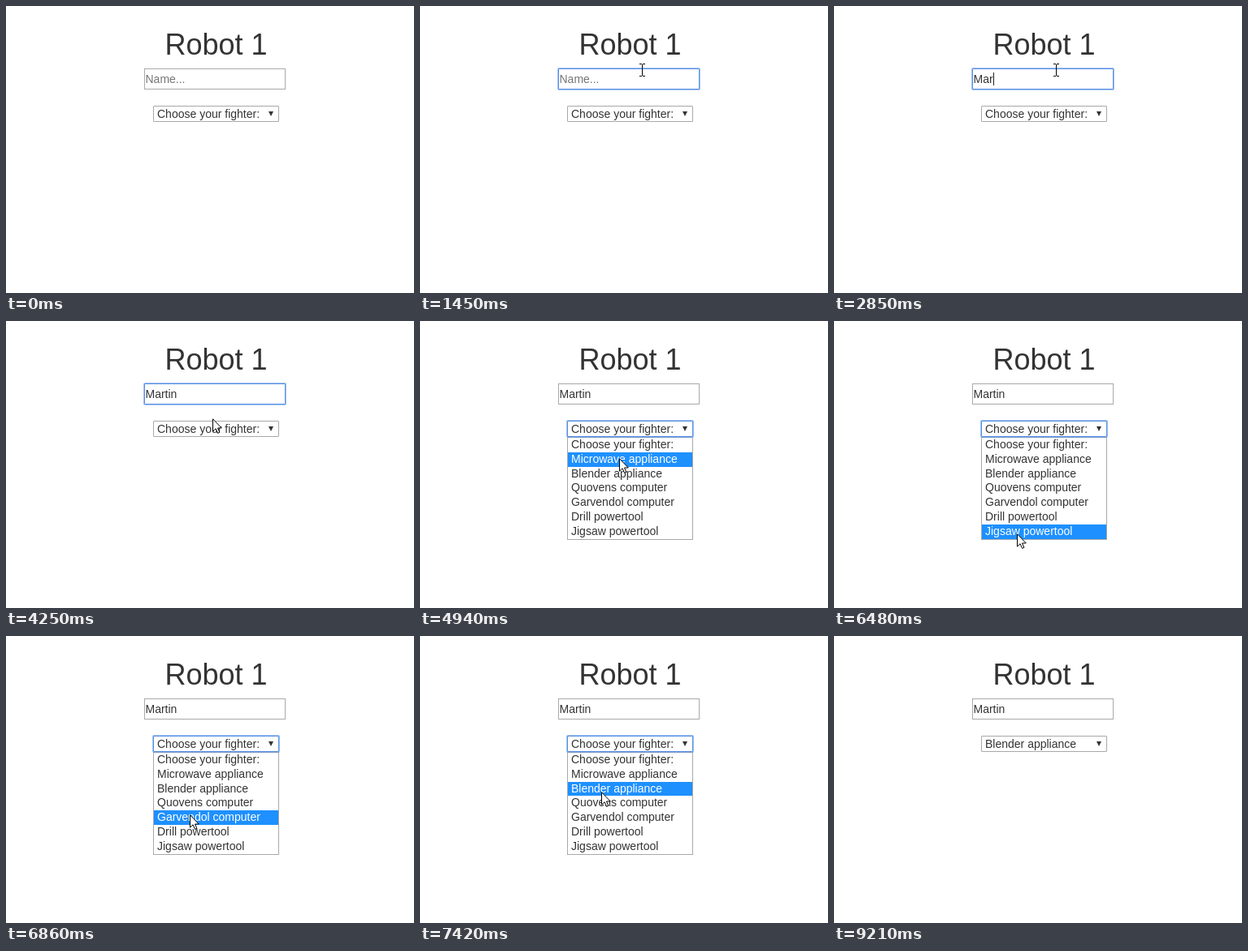
Write an HTML page that moves like this. It is 502x354 px and loops after 9310 ms.

```html
<!DOCTYPE html>
<html lang="en">
<head>
<meta charset="utf-8">
<title>Robot 1</title>
<style>
  html, body { margin: 0; width: 100%; height: 100%; overflow: hidden; background: #fff; }
  body { position: relative; font: 14px/16px "Liberation Sans", Arial, sans-serif; color: #333; }
  body * { box-sizing: border-box; }
  h1, .box, .box > b, .opt, svg { position: absolute; white-space: pre; }
  h1 { left: 195.5px; top: 27px; margin: 0; font-size: 36px; line-height: 41px; font-weight: 400; }
  .box { border: 1px solid #a9a9a9; background: #fff; }
  .focus { border-color: #5790e4; border-radius: 1px; box-shadow: 0 0 0 1px rgba(87, 144, 228, .55); }
  #field { left: 170px; top: 77px; width: 174px; height: 26px; padding: 4px .5px; }
  #hint { color: #757575; }
  #caret { display: inline-block; width: 1px; height: 16px; margin-right: -1px; background: #222; vertical-align: top; }
  #pick { left: 181px; top: 123px; width: 155px; height: 20px; padding: 1px 4px; border-radius: 1px; z-index: 2; }
  #pick b { left: 141px; top: 6px; width: 6px; height: 6px; background: #333; clip-path: polygon(0 0, 100% 0, 50% 100%); }
  #list { left: 181px; top: 143px; width: 155px; height: 127px; z-index: 1; }
  .opt { left: 0; width: 153px; padding-left: 4px; }
  .opt.on { background: #1e90ff; color: #fff; }
  svg { left: 0; top: 0; z-index: 3; overflow: visible; }
</style>
</head>
<body>
<h1>Robot 1</h1>
<div class="box" id="field"><span id="name"></span><i id="caret"></i><span id="hint">Name...</span></div>
<div class="box" id="pick"><span id="choice"></span><b></b></div>
<div class="box" id="list"></div>
<svg id="arrow" width="12" height="19"><path d="M.5 .8V16.2L4.1 12.8L6.6 18.4L8.9 17.4L6.5 12H11.3Z" fill="#fff" stroke="#000"/></svg>
<svg id="beam" width="7" height="16"><path d="M0 .5H3M4 .5H7M3.5 1V15M0 15.5H3M4 15.5H7" fill="none" stroke="#000"/></svg>
<script>
const LOOP = 9310, STEP = 75.5, BLINK = 550;
const ENTER = 290, FOCUS = 900, OPEN = 4410, CHOOSE = 7500, LEAVE = 8810, BLUR = 9210;
const NAME = "Martin";
const $ = id => document.getElementById(id);

const options = ["Choose your fighter:", "Microwave appliance", "Blender appliance",
  "Quovens computer", "Garvendol computer", "Drill powertool", "Jigsaw powertool"];
const keyTimes = [2620, 2850, 2850, 3080, 3250, 3320];

// The pointer is redrawn every STEP ms, counted from the start of each move
const moves = [ENTER, 3870, 4880, 5870, 6860, 7420, 8050, 8580];

// Pointer path: time, x, y
const path = [[ENTER, 461, 252], [820, 273, 79], [3870, 273, 79], [4250, 254, 120],
  [4800, 246, 164], [5560, 239, 215], [6480, 225, 262], [6790, 226, 223], [7420, 223, 192],
  [8000, 223, 192], [8200, 232, 267], [8500, 232, 267], [8730, 353, 343]];

const rowTop = i => Math.round(143.8 + 17.85 * i);
const rows = options.map((label, i) => {
  const row = document.createElement("div");
  row.className = "opt";
  row.textContent = label;
  row.style.top = rowTop(i) - 144 + "px";
  row.style.height = rowTop(i + 1) - rowTop(i) + "px";
  $("list").append(row);
  return row;
});

const within = (t, a, b) => t >= a && t < b;
const show = (el, on) => { el.style.visibility = on ? "visible" : "hidden"; };
const place = (el, x, y) => { el.style.transform = `translate(${x}px, ${y}px)`; };
const latest = (times, t) => Math.max(...times.filter(s => s <= t));

function pointer(t) {
  const from = latest([0, ...moves], t);
  const now = from + Math.floor((t - from) / STEP) * STEP;
  const next = path.findIndex(p => p[0] > now);
  const b = path.at(next);
  const a = next > 0 ? path[next - 1] : b;
  const u = a === b ? 0 : (now - a[0]) / (b[0] - a[0]);
  return [1, 2].map(k => Math.round(a[k] + (b[k] - a[k]) * u));
}

function draw(t) {
  const [x, y] = pointer(t);
  const visible = within(t, ENTER, LEAVE);
  const open = within(t, OPEN, CHOOSE);
  const editing = within(t, FOCUS, OPEN);
  const overField = !open && within(x, 170, 344) && within(y, 77, 103);

  const count = keyTimes.filter(s => s <= t).length;
  const idle = t - latest([0, FOCUS, ...keyTimes], t);
  $("name").textContent = NAME.slice(0, count);
  $("hint").textContent = count ? "" : "Name...";
  show($("caret"), editing && Math.floor(idle / BLINK) % 2 === 0);
  $("field").classList.toggle("focus", editing);

  $("choice").textContent = options[t >= CHOOSE ? 2 : 0];
  $("pick").classList.toggle("focus", within(t, OPEN, BLUR));
  show($("list"), open);
  const hover = Math.max(0, rows.filter((_, i) => rowTop(i) <= y).length - 1);
  rows.forEach((row, i) => row.classList.toggle("on", i === hover));

  place($("arrow"), x, y);
  place($("beam"), x - 3, y - 8);
  show($("arrow"), visible && !overField);
  show($("beam"), visible && overField);
}

const start = performance.now();
function frame() {
  draw((performance.now() - start) % LOOP);
  requestAnimationFrame(frame);
}
frame();
</script>
</body>
</html>
```
